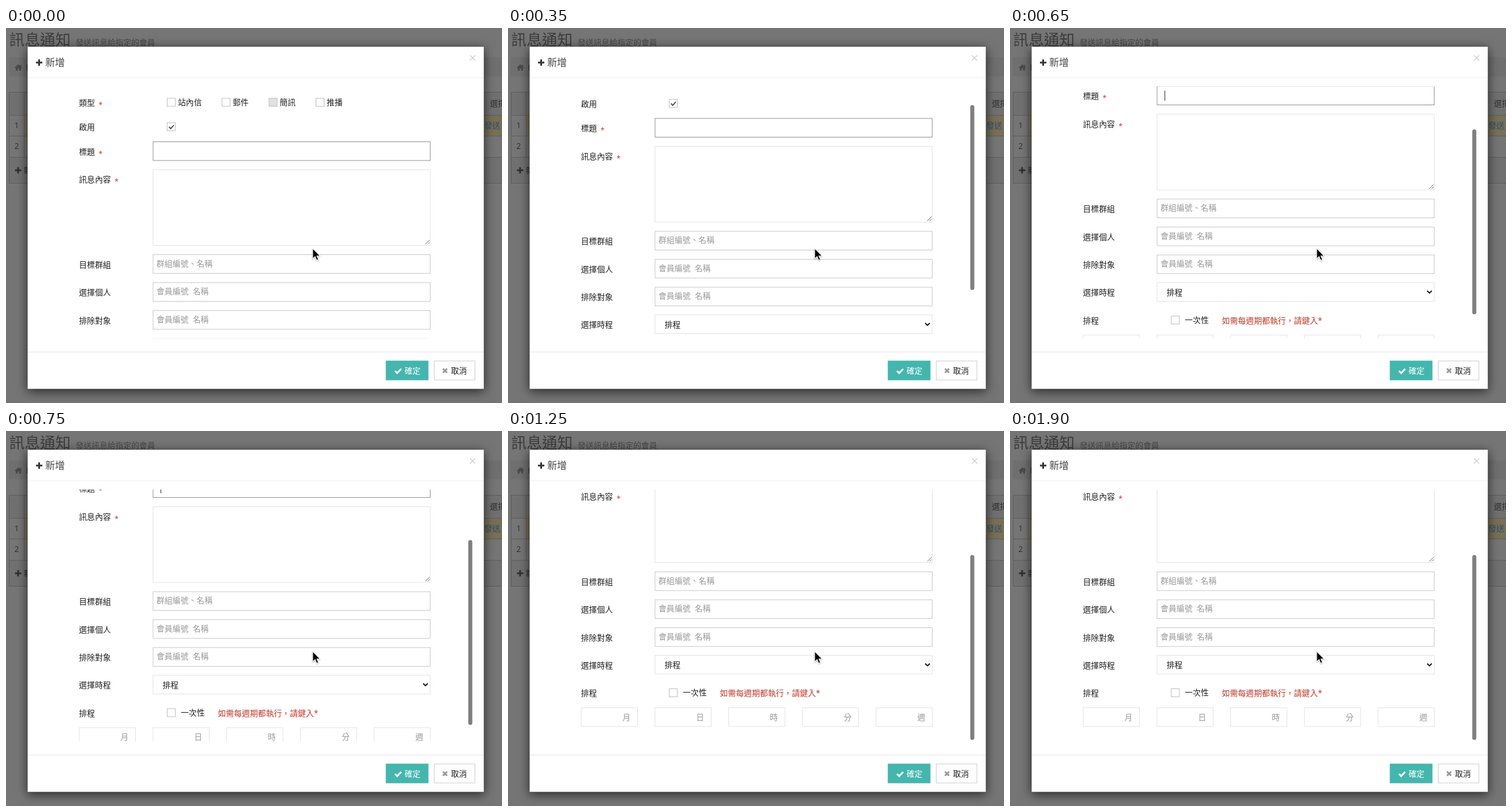
Animation of 860x651 px, one loop 1950 ms. Source, as an HTML page:

```html
<!DOCTYPE html>
<html lang="zh-Hant-TW">
<head>
<meta charset="utf-8">
<title>Dialog scroll</title>
<style>
html, body { margin: 0; width: 100%; height: 100%; overflow: hidden; background: #757575; }
svg { display: block; width: 860px; height: 651px; }
text { font-family: "Open Sans", "Noto Sans CJK TC", "Noto Sans CJK", sans-serif; white-space: pre; }
#dialog { filter: drop-shadow(0 4px 9px rgba(0, 0, 0, .5)) drop-shadow(0 0 1px rgba(0, 0, 0, .45)); }
#pointer { filter: drop-shadow(0 1px 1px rgba(0, 0, 0, .35)); }
</style>
</head>
<body>
<svg viewBox="0 0 860 651">
  <clipPath id="view"><rect x="38" y="101.5" width="790" height="437"/></clipPath>
  <g id="page"></g>
  <rect id="dialog" x="37.5" y="32.5" width="791" height="594" fill="#fff"/>
  <g id="chrome"></g>
  <g clip-path="url(#view)"><g id="form"></g></g>
  <rect id="thumb" x="801.5" width="7" height="321" rx="3.5" fill="#7f7f7f"/>
  <path id="pointer" d="M531.8 382.5V400.6L535.9 396.8L538.7 403.2L541.7 401.9L539 395.7H544.6Z"
    fill="#000" stroke="#fff" stroke-width="1.1"/>
</svg>
<script>
const LOOP = 1950, STEP = 50, SIZE = 13.86;
const byId = id => document.getElementById(id);

function add(parent, tag, attrs, content = '') {
  const node = document.createElementNS('http://www.w3.org/2000/svg', tag);
  for (const key in attrs) node.setAttribute(key, attrs[key]);
  node.textContent = content;
  byId(parent).append(node);
  return node;
}

// Text is placed by its left edge and vertical centre.
const label = (parent, x, cy, content, fill = '#222', size = SIZE, weight = 400) =>
  add(parent, 'text', { x, y: cy + size * .38, fill, 'font-size': size, 'font-weight': weight }, content);
const box = (parent, x, y, width, height, stroke = 'none', fill = '#fff') =>
  add(parent, 'rect', { x, y, width, height, stroke, fill });
const line = (parent, d, stroke, width = 1) =>
  add(parent, 'path', { d, stroke, 'stroke-width': width, fill: 'none' });
const plus = (parent, x, cy, fill) =>
  line(parent, `M${x} ${cy}h11M${x + 5.5} ${cy - 5.5}v11`, fill, 3);

function drawPage() {
  const ink = '#303030', rule = '#5c5c5c';
  label('page', 5.5, 20, '訊息通知', '#3d3d3d', 26.7, 300);
  label('page', 121, 25, '發送訊息給指定的會員', '#474747', 13.75, 300);
  box('page', 5, 51, 855, 33, 'none', '#6f6f6f');
  add('page', 'path', { d: 'M15 68.8L21.5 63L24.5 65.6V64H26.3V67.2L28 68.8L27 69.8L26 69V74H22.8V70.5H20.2V74H17V69L16 69.8Z', fill: '#4b4b4b' });
  line('page', 'M36.5 63.5v10', '#3c3c3c', 1.5);
  box('page', 5.5, 111.5, 860, 158, rule, '#757575');
  box('page', 6, 112, 854, 39, 'none', '#707070');
  box('page', 31, 151, 829, 36.5, 'none', '#786f56');
  box('page', 6, 225, 854, 44, 'none', '#707070');
  line('page', 'M5 151.5H860M5 187.5H860M5 224.5H860M31.5 112V224', rule);
  label('page', 14.5, 168.5, '1', ink);
  label('page', 14.5, 205, '2', ink);
  plus('page', 15.5, 247, ink);
  label('page', 30.5, 247, '新增', ink);
  label('page', 839, 131, '選擇', ink);
  label('page', 829.5, 169, '發送', '#2c4f70');
}

function drawChrome() {
  line('chrome', 'M38 86.5H828', '#efefef');
  line('chrome', 'M38 562.5H828', '#e5e5e5');
  plus('chrome', 52, 60, '#333');
  label('chrome', 68, 59.5, '新增', '#444', 17, 300);
  line('chrome', 'M804.5 47.5l9 9m0 -9l-9 9', '#ccc', 1.4);
  box('chrome', 658.5, 577.5, 74, 34, 'none', '#44b6ae');
  line('chrome', 'M674.4 595.2l3.8 3.8l7 -7.2', '#fff', 3);
  label('chrome', 691, 594.5, '確定', '#fff', SIZE, 500);
  box('chrome', 742.5, 578, 70.5, 33, '#ccc');
  line('chrome', 'M757.6 591.3l7.2 7.2m0 -7.2l-7.2 7.2', '#999', 3);
  label('chrome', 771.5, 594.5, '取消');
}

function check(x, y, content = '', gap = 18.5, fill = '#fff') {
  box('form', x, y, 14, 14, '#bcbcbc', fill);
  if (content) label('form', x + gap, y + 6.5, content);
}

function drawForm() {
  const rows = [['類型', 129.5, 160.5], ['啟用', 172], ['標題', 214.5, 160.5], ['訊息內容', 263, 188.3],
    ['目標群組', 410.5], ['選擇個人', 459], ['排除對象', 507.5], ['選擇時程', 555.5], ['排程', 604]];
  for (const [content, cy, star] of rows) {
    label('form', 126.5, cy, content);
    if (star) add('form', 'text', { x: star, y: cy + 8, fill: '#d02a22', 'font-size': 12.5 }, '*');
  }

  ['站內信', '郵件', '簡訊', '推播'].forEach((content, i) =>
    check([279.5, 374.5, 456, 537.5][i], 122, content, 18.5, i === 2 ? '#e0e0e0' : '#fff'));
  check(279.5, 164.5);
  line('form', 'M282.6 171.5l3 3.2l5.4 -6', '#555', 2);

  box('form', 255, 197.5, 480.5, 32.5, '#8f8f8f');
  box('form', 255, 246, 480.5, 131.5, '#e2e2e2');
  line('form', 'M727 375.5l7.5 -7.5M731 375.5l3.5 -3.5', '#666');

  ['群組編號、名稱', '會員編號  名稱', '會員編號  名稱'].forEach((content, i) => {
    const y = 393.5 + 48.5 * i;
    box('form', 255, y, 480.5, 32.5, '#c3c6c9');
    label('form', 261, y + 15, content, '#999');
  });

  box('form', 255, 538.5, 480.5, 32.5, '#e2e2e2');
  label('form', 271.5, 555, '排程');
  line('form', 'M723.3 552.7l4 4l4 -4', '#111', 2);

  check(279.5, 596.5, '一次性', 23.5);
  label('form', 367.5, 604, '如需每週期都執行，請鍵入*', '#c0392b');
  [...'月日時分週'].forEach((unit, i) => {
    const x = 127 + 127.8 * i;
    box('form', x, 629.5, 97.5, 32.5, '#e2e2e2');
    label('form', x + 71.5, 645.5, unit, '#999');
  });
}

drawPage();
drawChrome();
drawForm();
const caret = line('form', 'M268.5 205.5v17', '#222');

// Accelerates from rest, then glides to the end of the form.
function scrollAt(t) {
  if (t < 250) return 20.5 * (t / 250) ** 2;
  if (t < 500) return 20.5 + (t - 250) * .198;
  if (t < 750) return 70 + (t - 500) * .178;
  return Math.min(149, 114.5 + (t - 750) * .1725);
}

function draw(now) {
  const t = Math.floor(now % LOOP / STEP) * STEP;
  const offset = scrollAt(t);
  byId('form').setAttribute('transform', `translate(0 ${-Math.round(offset * 2) / 2})`);
  byId('thumb').setAttribute('y', 103.6 + offset * .749);
  byId('thumb').setAttribute('opacity', t < STEP ? 0 : 1);
  caret.setAttribute('opacity', t >= 550 && t < 1050 ? 1 : 0);
}

const start = performance.now();
function tick() {
  draw(performance.now() - start);
  requestAnimationFrame(tick);
}
tick();
</script>
</body>
</html>
```
